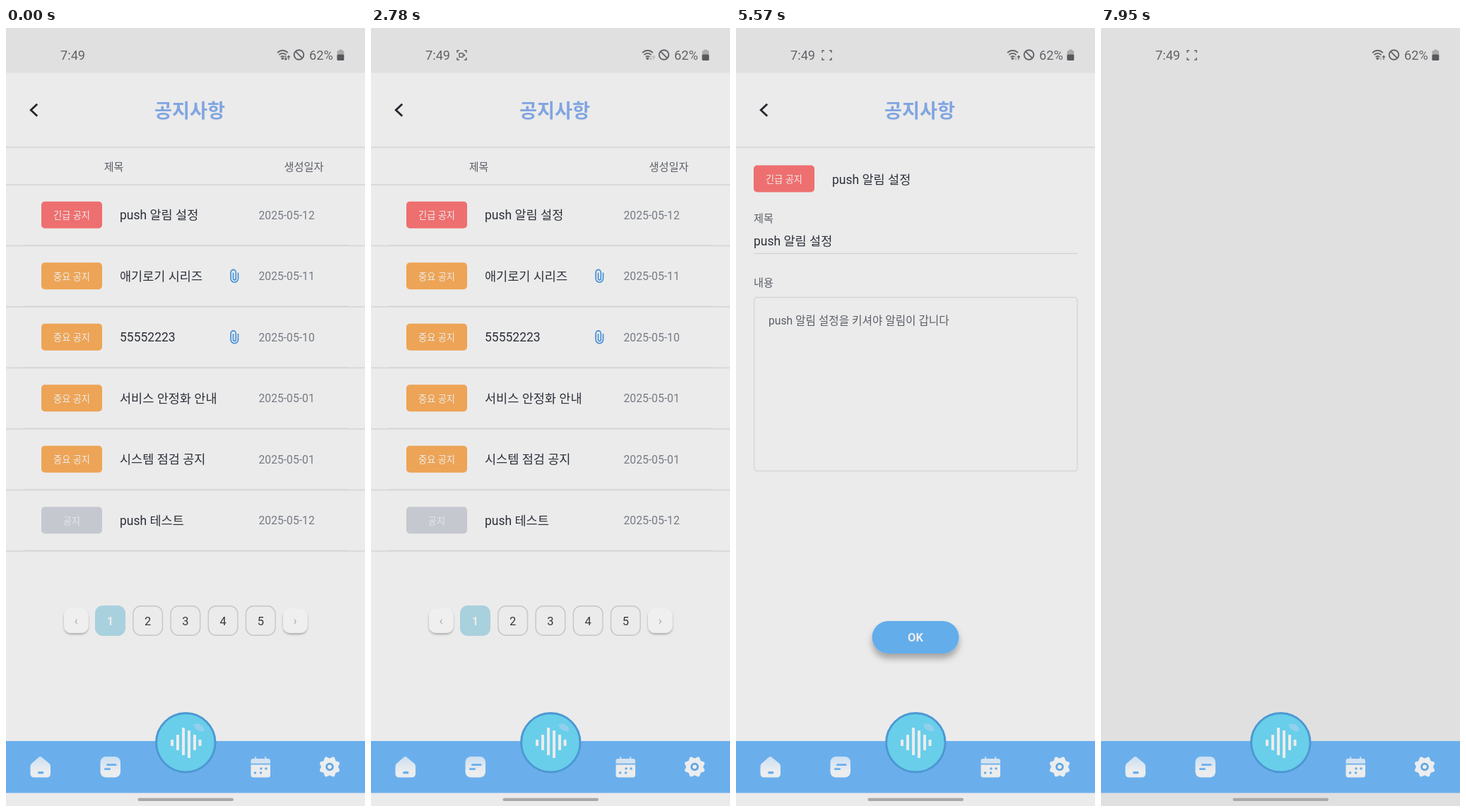
Animation, 508 px wide and 1102 px high, one loop 8 s. Source, as an HTML page:

```html
<!DOCTYPE html>
<html lang="ko">
<head>
<meta charset="utf-8">
<style>
  html, body { margin: 0; width: 100%; height: 100%; overflow: hidden; background: #e0e0e0; }
  svg { display: block; width: 508px; height: 1102px; font-family: Roboto, 'Noto Sans CJK KR', 'Noto Sans CJK', sans-serif; }
</style>
</head>
<body>
<svg id="stage" viewBox="0 0 508 1102" xmlns="http://www.w3.org/2000/svg"></svg>
<script>
const LOOP = 8000;
const INK = '#2c303a', MUTED = '#767b84', LABEL = '#5a5e66', LIGHT = '#ececec', BLUE = '#6aafec';
const STATUS = '#626468', FAINT = '#b9babc';

const text = (x, y, size, fill, str, anchor = 'start', weight = 400) =>
  `<text x="${x}" y="${y}" font-size="${size}" fill="${fill}" text-anchor="${anchor}" font-weight="${weight}">${str}</text>`;
const rect = (x, y, w, h, fill, r = 0, extra = '') =>
  `<rect x="${x}" y="${y}" width="${w}" height="${h}" rx="${r}" fill="${fill}" ${extra}/>`;
const stroke = (d, color, width, extra = '') =>
  `<path d="${d}" fill="none" stroke="${color}" stroke-width="${width}" ${extra}/>`;
const group = (id, ...parts) => `<g id="${id}">${parts.join('')}</g>`;
const badge = (x, y, fill, label, color = LIGHT) =>
  rect(x, y, 86, 38, fill, 5) + text(x + 43, y + 24.3, 13.2, color, label, 'middle', 500);

const defs = `<defs>
  <linearGradient id="icon" x2="0" y2="1"><stop stop-color="#cbdff2"/><stop offset=".7" stop-color="#ebedef"/></linearGradient>
  <filter id="soft" x="-30%" y="-30%" width="160%" height="190%"><feDropShadow dx="0" dy="2" stdDeviation="1.5" flood-opacity=".28"/></filter>
  <filter id="deep" x="-30%" y="-30%" width="160%" height="200%"><feDropShadow dx="0" dy="7" stdDeviation="5" flood-opacity=".3"/></filter>
</defs>`;

function statusBar() {
  const corners = 'M122 35V32H125M132 32H135V35M135 42V45H132M125 45H122V42';
  return text(77, 45, 18.2, STATUS, '7:49') +
    group('capture', stroke(corners, STATUS, 1.5)) +
    group('camera', rect(124.8, 35.8, 5.6, 5.4, 'none', 1, `stroke="${STATUS}" stroke-width="1.4"`),
      `<path d="M130.5 38.5l2.5-2v4z" fill="${STATUS}"/>`) +
    stroke('M384 35Q391.5 28.5 399 35M386.4 38Q391.5 33.8 396.6 38M388.8 41Q391.5 38.8 394.2 41', STATUS, 1.7) +
    `<circle cx="391.3" cy="43.2" r="1.8" fill="${STATUS}"/>` +
    stroke('M395.8 39.5V45M394 43L395.8 45 397.6 43', STATUS, 1.3, 'id="down"') +
    stroke('M400 45V39.5M398.2 41.5L400 39.5 401.8 41.5', STATUS, 1.3, 'id="up"') +
    `<circle cx="414.5" cy="38" r="6.8" fill="none" stroke="${STATUS}" stroke-width="1.9"/>` +
    stroke('M409.7 33.2L419.3 42.8', STATUS, 1.9) +
    text(429, 45, 18.3, STATUS, '62%') +
    rect(471, 30.5, 5, 3, '#aaabad', 1) + rect(468.5, 32, 9.8, 14, '#aaabad', 1.5) +
    rect(468.5, 37.5, 9.8, 8.5, '#56585c', 1.5);
}

function header() {
  return rect(0, 63.5, 508, 1038.5, '#ebebeb') +
    stroke('M44.2 107.8L35.2 116.3 44.2 124.8', '#22252b', 2.8) +
    text(260, 127.3, 27.2, '#80a5e1', '공지사항', 'middle', 600) +
    rect(0, 168, 508, 2, '#d9d9d9');
}

function listPage() {
  const orange = '#eda456', important = '중요 공지';
  const rows = [
    ['#ee6f6f', '긴급 공지', 'push 알림 설정', '2025-05-12'],
    [orange, important, '애기로기 시리즈', '2025-05-11', true],
    [orange, important, '55552223', '2025-05-10', true],
    [orange, important, '서비스 안정화 안내', '2025-05-01'],
    [orange, important, '시스템 점검 공지', '2025-05-01'],
    ['#c5c8cf', '공지', 'push 테스트', '2025-05-12'],
  ];
  let out = text(152.5, 201.5, 15, LABEL, '제목', 'middle') +
    text(421.5, 201.5, 15.2, LABEL, '생성일자', 'middle') + rect(0, 221, 508, 2, '#d9d9d9');
  rows.forEach(([color, tag, title, date, clip], i) => {
    const y = 265 + i * 86.5;
    out += badge(50, y - 19.3, color, tag, i === 5 ? '#e6e7e9' : LIGHT) +
      text(161, y + 6.4, 17.5, INK, title) + text(357.5, y + 5.7, 15.7, MUTED, date) +
      rect(0, y + 42.4, 508, 2, '#dadada') + rect(25, y + 42, 459, 1, '#d6d6d7');
    if (clip) out += stroke(`M328.5 ${y - 5}v8.5a5.2 5.2 0 0 1-10.4 0v-9a3.6 3.6 0 0 1 7.2 0v9a1.9 1.9 0 0 1-3.8 0v-8.5`, '#3d8bd8', 1.6);
  });
  [[82, '‹'], [392, '›']].forEach(([x, arrow]) => {
    out += rect(x, 822, 34.5, 35, '#efefef', 10, 'filter="url(#soft)"') + text(x + 17.2, 845, 16, '#a4a5a8', arrow, 'middle');
  });
  for (let n = 1; n <= 5; n++) {
    const x = 126 + (n - 1) * 53.2;
    out += n === 1
      ? rect(x, 818, 43, 43, '#a9d0dd', 11)
      : rect(x + .7, 818.7, 41.6, 41.6, 'none', 11, 'stroke="#c6c6c9" stroke-width="1.4"');
    out += text(x + 21.5, 845.7, 16.5, n === 1 ? LIGHT : '#34373d', n, 'middle', n === 1 ? 700 : 400);
  }
  return out;
}

function detailPage() {
  const title = 'push 알림 설정';
  return badge(25, 194.5, '#ee6f6f', '긴급 공지') + text(136, 220.6, 17.5, INK, title) +
    text(25, 274.5, 15.2, LABEL, '제목') + text(25, 308.4, 17.5, INK, title) +
    rect(25, 318.8, 458.5, 1.3, '#d2d3d5') + text(25, 366.3, 15.2, LABEL, '내용') +
    rect(25.6, 381.5, 457.4, 246, 'none', 4, 'stroke="#d5d6d8" stroke-width="1.4"') +
    text(46, 419.7, 15.7, LABEL, 'push 알림 설정을 키셔야 알림이 갑니다') +
    rect(192.5, 840, 123, 46, '#64adea', 23, 'filter="url(#deep)"') +
    text(254, 869.4, 16.5, LIGHT, 'OK', 'middle', 700);
}

function navBar() {
  const icon = 'url(#icon)';
  const bars = [[235, 1008, 9], [243, 1001, 22], [251, 991, 39], [259, 995, 39], [267, 1001, 22], [274.5, 1008, 9]];
  const gear = Array.from({ length: 64 }, (_, i) => {
    const a = i * Math.PI / 32, r = 13.6 + 1.5 * Math.cos(8 * a + Math.PI);
    return `${(458 + r * Math.cos(a)).toFixed(1)},${(1046.5 + r * Math.sin(a)).toFixed(1)}`;
  }).join(' ');
  const dots = [[361, 1049], [368, 1049], [352.5, 1055], [360.5, 1055]];
  return rect(0, 1010, 508, 73.5, BLUE) +
    `<path d="M46 1033.2Q48.5 1031 51 1033.2L61 1041.5Q63 1043 63 1046V1056Q63 1061.500 57.500 1061.500H40Q34.500 1061.500 34.500 1056V1046Q34.500 1043 36.500 1041.500Z" fill="${icon}"/>` +
    rect(45, 1053, 8.5, 3.6, BLUE, 1.8) +
    rect(133.500, 1032, 28.500, 29.500, icon, 8) +
    rect(142, 1042.300, 14.500, 2.700, BLUE, 1.3) + rect(139, 1048.300, 9, 2.700, BLUE, 1.3) +
    rect(352, 1032, 2.200, 5, '#c4dbf1', 1) + rect(366, 1032, 2.200, 5, '#c4dbf1', 1) +
    `<path d="M346.500 1041.800V1038Q346.500 1035 349.500 1035H371Q374 1035 374 1038V1041.800Z" fill="#d3e2f0"/>` +
    `<path d="M346.500 1043.600H374V1058Q374 1061.500 370.500 1061.500H350Q346.500 1061.500 346.500 1058Z" fill="${LIGHT}"/>` +
    dots.map(([x, y]) => `<circle cx="${x}" cy="${y}" r="1.8" fill="${BLUE}"/>`).join('') +
    `<polygon points="${gear}" fill="#ebedef"/><circle cx="458" cy="1046.500" r="4.400" fill="none" stroke="#5da4e2" stroke-width="2.800"/>` +
    `<circle cx="254.300" cy="1012.200" r="41.700" fill="#69ceea" stroke="#4d98d3" stroke-width="3"/>` +
    bars.map(([x, y, h]) => rect(x - 2, y, 4, h, LIGHT, .8)).join('') +
    `<path d="M265 986.500Q274 983.500 278.500 989.500Q281 993 279.500 996.500Q268 996.500 265 986.500Z" fill="#92cfee"/>` +
    rect(186.500, 1090.700, 135.500, 4.300, '#a9a9aa', 2.1);
}

const stage = document.getElementById('stage');
stage.innerHTML = defs + rect(0, 0, 508, 1102, '#e0e0e0') +
  group('page', header(), group('list', listPage()), group('detail', detailPage())) +
  statusBar() + navBar();

const part = id => document.getElementById(id);
const [page, list, detail, capture, camera, down, up] =
  ['page', 'list', 'detail', 'capture', 'camera', 'down', 'up'].map(part);
const show = (el, on) => el.setAttribute('visibility', on ? 'inherit' : 'hidden');

function draw() {
  const t = performance.now() % LOOP;
  const reading = t >= 3680 && t < 6830;
  show(page, t < 7530);
  show(list, !reading);
  show(detail, reading);
  show(capture, t >= 70);
  show(camera, t >= 70 && t < 3680);
  down.setAttribute('stroke', t < 1740 ? STATUS : FAINT);
  up.setAttribute('stroke', t < 1740 || t >= 5430 ? STATUS : FAINT);
  requestAnimationFrame(draw);
}
draw();
</script>
</body>
</html>
```
